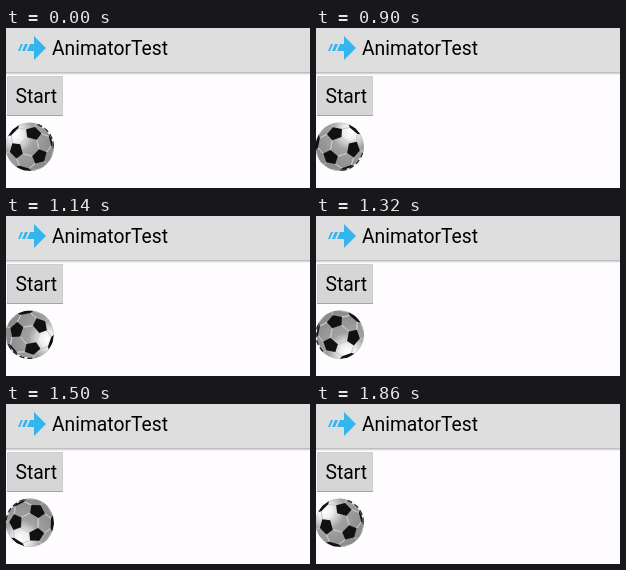
An HTML page that plays this animation: 304 by 160 pixels, repeating every 2.46 s.

```html
<!DOCTYPE html>
<html lang="en">
<head>
<meta charset="utf-8">
<title>AnimatorTest</title>
<style>
html, body { margin: 0; width: 100%; height: 100%; overflow: hidden; background: #fffcff; }
svg { display: block; width: 304px; height: 160px; }
text { font: 19.3px Roboto, sans-serif; fill: #000; }
</style>
</head>
<body>
<svg viewBox="0 0 304 160">
  <defs>
    <radialGradient id="leather" cx=".2" cy=".25" r=".8">
      <stop offset="0" stop-color="#fff"/>
      <stop offset=".2" stop-color="#eee"/>
      <stop offset=".5" stop-color="#a2a2a2"/>
      <stop offset="1" stop-color="#8c8c8c"/>
    </radialGradient>
    <linearGradient id="shadow" x2="0" y2="1">
      <stop offset="0" stop-color="#b3b2b3"/>
      <stop offset="1" stop-color="#fffcff"/>
    </linearGradient>
    <clipPath id="disc"><circle r="24.3"/></clipPath>
    <clipPath id="view"><rect y="93" width="49" height="51"/></clipPath>
  </defs>
  <rect width="304" height="160" fill="#fffcff"/>
  <rect width="304" height="44" fill="#dedede"/>
  <rect y="44" width="304" height="3" fill="url(#shadow)"/>
  <path d="M12 23l3-7h2l-3 7zM16 23l3-7h3l-3 7zM21 23l3-7h4V8l12 12-12 12v-9z" fill="#33b5ee"/>
  <text x="46" y="27">AnimatorTest</text>
  <g id="idle">
    <rect x="1" y="48" width="56" height="40" rx="1" fill="#d6d6d6"/>
    <path d="M1.5 87V48.5h55V87" fill="none" stroke="#cecece"/>
    <path d="M1 87.5h56" stroke="#a5a5a5"/>
  </g>
  <g id="pressed">
    <rect x="-3" y="45" width="64" height="46" rx="3" fill="#9bdcf6"/>
    <rect x="1" y="48" width="56" height="40" rx="1" fill="#46b9ec"/>
    <path d="M1 87.5h56" stroke="#3797c2"/>
  </g>
  <text x="9.5" y="75">Start</text>
  <g clip-path="url(#view)">
    <g id="ball">
      <circle r="24.3" fill="url(#leather)"/>
      <g clip-path="url(#disc)">
        <path id="seams" fill="none" stroke="#ccc" stroke-width=".8"/>
        <path id="patches" fill="#111"/>
        <path d="M8-22.5A24 24 0 0 1 24 0" fill="none" stroke="#fffcff" stroke-width="2"/>
        <path d="M8-22.5A24 24 0 0 1 24 0" fill="none" stroke="#222" stroke-width="2" stroke-dasharray="5 3"/>
      </g>
    </g>
  </g>
</svg>
<script>
const LOOP = 2460, STEP = 60;
const PRESS = 660, RELEASE = 780, SPIN_START = 600, SPIN_END = 1860;
const RADIUS = 24.3;
const $ = id => document.getElementById(id);

// Icosahedron corners, seen along a face axis, are the centres of the dark patches.
const triad = (polar, offset) => [0, 120, 240].map(step => {
  const a = (offset + step) * Math.PI / 180, b = polar * Math.PI / 180;
  return [Math.sin(b) * Math.cos(a), Math.sin(b) * Math.sin(a), Math.cos(b)];
});
const front = [...triad(37.38, -75), ...triad(79.19, -15)];
const all = [...front, ...front.map(v => v.map(c => -c))];
const dot = (a, b) => a[0] * b[0] + a[1] * b[1] + a[2] * b[2];
const neighbours = v => all.filter(w => w !== v && dot(v, w) > 0.4);

// Points behind the ball are moved out to its rim.
function corner(v, w) {
  const [x, y, z] = v.map((c, i) => 2 * c + w[i]);
  const scale = RADIUS / Math.hypot(x, y, Math.max(z, 0));
  return [x * scale, y * scale];
}
const point = p => p.map(c => c.toFixed(2)).join(" ");

function pentagon(v) {
  const corners = neighbours(v).map(w => corner(v, w));
  const mid = [0, 1].map(i => corners.reduce((sum, p) => sum + p[i], 0) / 5);
  const angle = p => Math.atan2(p[1] - mid[1], p[0] - mid[0]);
  corners.sort((a, b) => angle(a) - angle(b));
  return "M" + corners.map(point).join("L") + "Z";
}

$("patches").setAttribute("d", front.map(pentagon).join(""));
$("seams").setAttribute("d", front.flatMap(v => neighbours(v)
  .map(w => `M${point(corner(v, w))}L${point(corner(w, v))}`)).join(""));

function draw(time) {
  const t = Math.floor(time % LOOP / STEP) * STEP;
  const down = t >= PRESS && t < RELEASE;
  $("idle").style.display = down ? "none" : "";
  $("pressed").style.display = down ? "" : "none";
  const spinTime = down ? PRESS : t;
  const turn = t < PRESS ? 0
    : 360 * Math.min(1, (spinTime - SPIN_START) / (SPIN_END - SPIN_START));
  $("ball").setAttribute("transform", `translate(23.7 118.7) rotate(${turn.toFixed(2)})`);
}

const start = performance.now();
function tick() {
  draw(performance.now() - start);
  requestAnimationFrame(tick);
}
draw(0);
requestAnimationFrame(tick);
</script>
</body>
</html>
```
